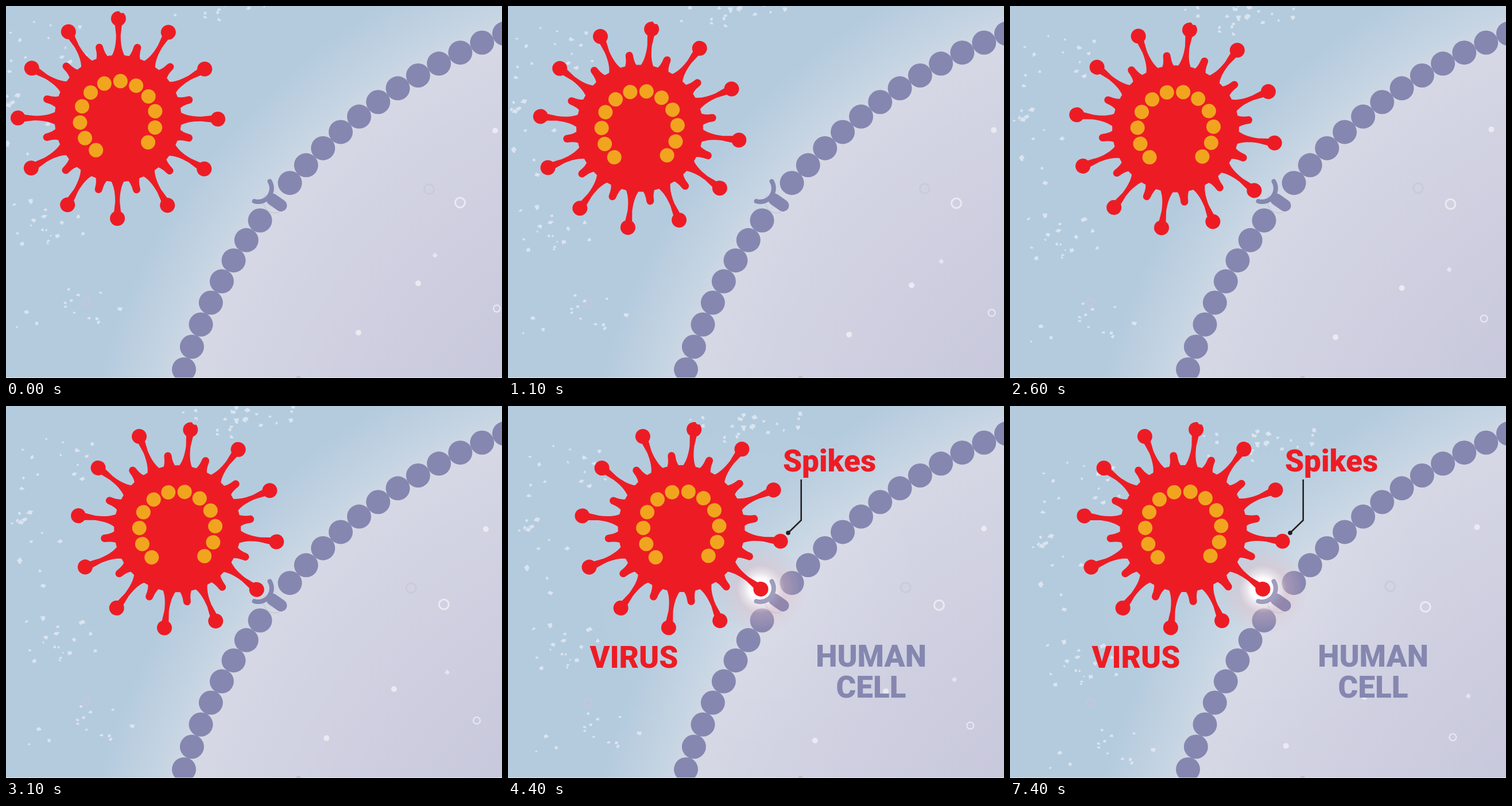
These frames come from a looping animation (864 px wide and 648 px high, 8 s). An HTML page with a canvas:

```html
<!DOCTYPE html>
<html lang="en">
<head>
<meta charset="utf-8">
<title>Virus meets cell</title>
<style>
html, body { margin: 0; width: 100%; height: 100%; overflow: hidden; background: #b4cbde; }
canvas { display: block; }
</style>
</head>
<body>
<canvas id="stage" width="864" height="648"></canvas>
<script>
const ctx = document.getElementById('stage').getContext('2d');
const TAU = Math.PI * 2, DEG = Math.PI / 180;
const LOOP = 8000, STEP = 100, LAST = 7400;
const BLUE = '#b4cbde', RED = '#ed1c24', PURPLE = '#8587b0', ORANGE = '#f1a51f', INK = '#231f20';
const PALE = '#ebeaf2', FAINT = '#c9cadb';
const CELL = { x: 1201.3, y: 924.6, r: 937.8 };
const CONTACT = { x: 440, y: 319 };

// Virus pose keys
const POSES = [
  { t: 0, x: 195, y: 196, angle: 0.3 },
  { t: 1100, x: 229.5, y: 213, angle: 6.8 },
  { t: 1900, x: 265, y: 212, angle: 9.6 },
  { t: 2600, x: 288.5, y: 214, angle: 8.1 },
  { t: 3500, x: 302, y: 213.5, angle: 7.3 }
];

// Clouds of specks: centre, half extents, count
const CLOUDS = [
  { x: 390, y: -6, w: 120, h: 42, n: 25 },
  { x: 75, y: 70, w: 85, h: 55, n: 14 },
  { x: 15, y: 200, w: 75, h: 90, n: 14 },
  { x: 70, y: 368, w: 70, h: 55, n: 18 },
  { x: 120, y: 522, w: 125, h: 50, n: 14 },
  { x: 746, y: 433, w: 4, h: 12, n: 2 }
];

const spike = new Path2D('M-14-105C-7-114-4-128-4-145L-6-163H6L4-145C4-128 7-114 14-105Z');
spike.arc(0, -174, 13, 0, TAU);
const nub = new Path2D('M-12-107Q-6.5-113-6.5-128A6.5 6.5 0 0 1 6.5-128Q6.5-113 12-107Z');
const receptorArms = new Path2D('M459.5 305.5A23.5 23.5 0 0 1 432.5 340');
const receptorStem = new Path2D('M464 337L479 347.5');
const pointer = new Path2D('M510.7 128V199L488 221');
const specks = makeSpecks();

function dot(x, y, r, fill) {
  ctx.beginPath();
  ctx.arc(x, y, r, 0, TAU);
  ctx.fillStyle = fill;
  ctx.fill();
}

function ring(x, y, r, width, colour) {
  ctx.beginPath();
  ctx.arc(x, y, r, 0, TAU);
  line(undefined, width, colour);
}

function line(path, width, colour) {
  ctx.lineWidth = width;
  ctx.strokeStyle = colour;
  path ? ctx.stroke(path) : ctx.stroke();
}

function radial(x, y, r, stops) {
  const g = ctx.createRadialGradient(x, y, 0, x, y, r);
  for (const [at, colour] of stops) g.addColorStop(at / r, colour);
  return g;
}

// All specks as one path of irregular quads, denser at each cloud's centre
function makeSpecks() {
  let seed = 7;
  const random = () => (seed = seed * 16807 % 2147483647) / 2147483647;
  const spread = () => random() + random() - 1;
  const path = new Path2D();
  for (const c of CLOUDS) {
    for (let i = 0; i < c.n; i++) {
      const x = c.x + c.w * spread(), y = c.y + c.h * spread();
      const size = 2.6 + 3.2 * random() ** 2, turn = random() * TAU;
      for (let k = 0; k < 4; k++) {
        const a = turn + k * TAU / 4 + 0.4 * spread();
        const r = size * (1 + 0.5 * spread());
        path[k ? 'lineTo' : 'moveTo'](x + r * Math.cos(a), y + r * 0.85 * Math.sin(a));
      }
      path.closePath();
    }
  }
  return path;
}

// Smooth curve through the pose keys, at rest at both ends
function pose(ms) {
  const end = POSES.length - 1;
  const next = POSES.findIndex(p => p.t > ms);
  if (next < 0) return POSES[end];
  const i = next - 1, a = POSES[i], b = POSES[next];
  const span = b.t - a.t, u = (ms - a.t) / span, v = 1 - u;
  const slope = (n, key) => n === 0 || n === end ? 0
    : (POSES[n + 1][key] - POSES[n - 1][key]) / (POSES[n + 1].t - POSES[n - 1].t) * span;
  const at = key => a[key] + (b[key] - a[key]) * u * u * (3 - 2 * u)
    + u * v * (slope(i, key) * v - slope(next, key) * u);
  return { x: at('x'), y: at('y'), angle: at('angle') };
}

function drawBackground() {
  ctx.fillStyle = radial(CELL.x, CELL.y, 1080, [
    [430, '#c8c8dc'], [780, '#d1d2e2'], [930, '#d6d8e5'], [970, '#c7d5e3'], [1075, BLUE]
  ]);
  ctx.fillRect(0, 0, 864, 648);
  ring(509.5, 651, 5, 1.5, '#c9a58f');
  ring(140, 516, 6, 3.2, '#c5c5df');
}

function drawMembrane() {
  for (let i = 0; i <= 20; i++) {
    if (i === 8) continue; // the receptor's place
    const a = (198.12 + 2.553 * i) * DEG;
    dot(CELL.x + CELL.r * Math.cos(a), CELL.y + CELL.r * Math.sin(a), 21, PURPLE);
  }
}

function drawReceptor() {
  ctx.beginPath();
  ctx.arc(468.5, 340, 20.5, 70 * DEG, 215 * DEG);
  line(undefined, 0.7, '#b3b4c4');
  ctx.lineCap = 'round';
  line(receptorArms, 8, PURPLE);
  line(receptorStem, 21, PURPLE);
  ctx.lineCap = 'butt';
}

function glow(r, alpha, stops) {
  ctx.globalAlpha = alpha;
  dot(CONTACT.x, CONTACT.y, r, radial(CONTACT.x, CONTACT.y, r, stops));
  ctx.globalAlpha = 1;
}

function drawFloaters(t) {
  dot(614 - 18 * t, 569 + 3.1 * t, 5, PALE);
  dot(718 - 13.6 * t, 483 + 3.2 * t, 5, PALE);
  dot(852 - 5.2 * t, 217 - 0.8 * t, 5, PALE);
  ring(791 - 9.1 * t, 342.5 + t, 8.5, 3, PALE);
  ring(737 - 10.1 * t, 319 - 0.65 * t, 8.5, 3, FAINT);
  ring(855 - 11.3 * t, 527 + 6.75 * t, 6, 2, PALE);
}

function drawSpecks(t) {
  ctx.save();
  ctx.translate(6.9 * t, 9.6 * t);
  ctx.fillStyle = 'rgba(236,241,248,.68)';
  ctx.fill(specks);
  ctx.restore();
}

function drawVirus(ms) {
  const { x, y, angle } = pose(ms);
  ctx.save();
  ctx.translate(x, y);
  ctx.rotate(angle * DEG);
  dot(0, 0, 110.5, RED);
  for (let i = 0; i < 12; i++) {
    ctx.fill(spike);
    ctx.rotate(15 * DEG);
    ctx.fill(nub);
    ctx.rotate(15 * DEG);
  }
  dot(6, -188.5, 5, BLUE); // chip in the top knob
  for (let i = 0; i < 12; i++) {
    const a = (-145 + 24.75 * i) * DEG;
    dot(66.3 * Math.sin(a), 1 - 66.3 * Math.cos(a), 12.5, ORANGE);
  }
  ctx.restore();
}

function label(text, x, y, colour) {
  ctx.fillStyle = colour;
  ctx.fillText(text, x, y);
}

function drawLabels(alpha) {
  ctx.globalAlpha = alpha;
  ctx.font = '900 53px Roboto, "Liberation Sans", sans-serif';
  ctx.textAlign = 'center';
  label('Spikes', 560, 114, RED);
  label('VIRUS', 219.5, 456, RED);
  label('HUMAN', 632.5, 454, PURPLE);
  label('CELL', 632.5, 508, PURPLE);
  line(pointer, 2.6, INK);
  dot(488, 221, 3.8, INK);
  ctx.globalAlpha = 1;
}

function draw(ms) {
  const t = ms / 1000;
  const fade = Math.max(0, Math.min(1, (ms - 3400) / 600));
  drawBackground();
  glow(300, fade, [[0, 'rgba(255,255,255,.1)'], [300, 'rgba(255,255,255,0)']]);
  drawMembrane();
  glow(70, fade, [
    [0, '#fff'], [19, '#fff'], [27, 'rgba(255,250,250,.55)'],
    [42, 'rgba(250,235,238,.2)'], [70, 'rgba(250,230,235,0)']
  ]);
  drawReceptor();
  glow(80, fade, [
    [0, 'rgba(255,255,255,.25)'], [24, 'rgba(250,235,240,.22)'],
    [42, 'rgba(210,130,145,.17)'], [80, 'rgba(220,150,165,0)']
  ]);
  drawFloaters(t);
  drawSpecks(t);
  drawLabels(fade);
  drawVirus(ms);
  ctx.fillStyle = 'rgba(255,255,255,.6)';
  ctx.fillRect(0, 647, 864, 1);
}

const start = performance.now();
function tick() {
  const ms = (performance.now() - start) % LOOP;
  draw(Math.min(LAST, Math.floor(ms / STEP) * STEP));
  requestAnimationFrame(tick);
}
tick();
</script>
</body>
</html>
```
